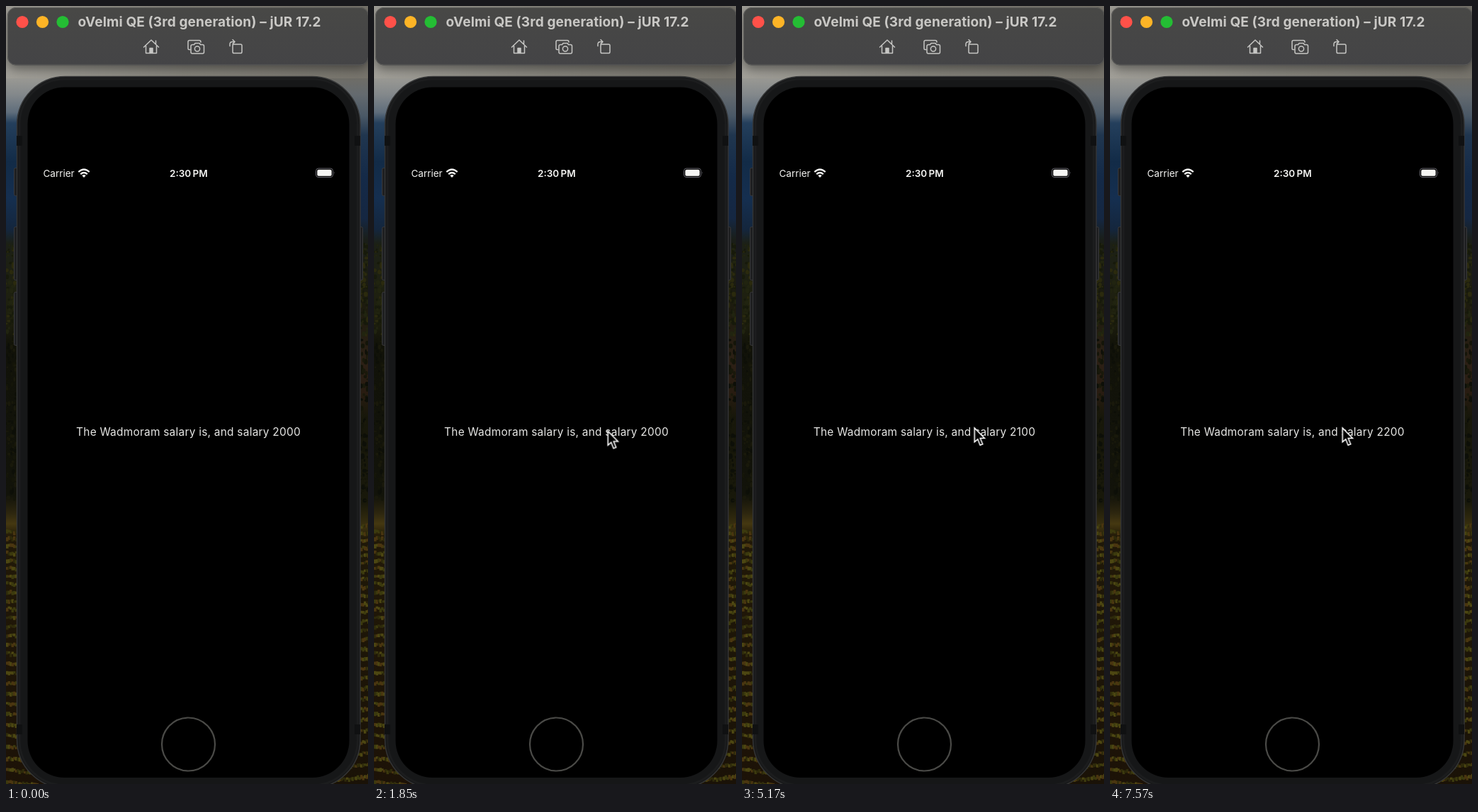
Animation, 511 px wide and 1097 px high, one loop 7.59 s. Source, as an HTML page with a canvas:

```html
<!DOCTYPE html>
<html lang="en">
<head>
<meta charset="utf-8">
<title>Salary counter</title>
<style>
  html, body { margin: 0; width: 100%; height: 100%; overflow: hidden; background: #000; }
  body { font-family: Inter, sans-serif; }
  canvas, .ui, .pointer { position: absolute; left: 0; top: 0; }
  .label {
    position: absolute; left: 31px; top: 586px; width: 453px; height: 30px;
    overflow: hidden; text-align: center; white-space: nowrap;
    font-size: 15.4px; line-height: 30px; letter-spacing: .26px; color: #e6e6e4;
  }
  .reel { animation: count 7590ms step-end infinite; }
  .pointer { width: 20px; height: 30px; overflow: visible; animation: move 7590ms linear infinite; }

  @keyframes count {
    0%    { transform: translateY(0); }
    33.4% { transform: translateY(-30px); }
    55.2% { transform: translateY(-60px); }
    76.7% { transform: translateY(-90px); }
    92.5% { transform: translateY(-120px); }
  }
  @keyframes move {
    0%, 6%      { transform: translate(514px, 908px); animation-timing-function: ease-out; }
    9.1%        { transform: translate(456.5px, 857.5px); animation-timing-function: ease-in-out; }
    20.6%       { transform: translate(337px, 622px); animation-timing-function: ease-out; }
    24%, 27%    { transform: translate(329.5px, 598.5px); animation-timing-function: ease-out; }
    30%, 100%   { transform: translate(327.5px, 594px); }
  }
</style>
</head>
<body>
<canvas id="scene" width="511" height="1097"></canvas>

<svg class="ui" width="511" height="1097" viewBox="0 0 511 1097">
  <defs>
    <linearGradient id="bar" x2="0" y2="1">
      <stop offset="0" stop-color="#484846"/>
      <stop offset="1" stop-color="#444446"/>
    </linearGradient>
    <filter id="soft" x="-10%" y="-20%" width="120%" height="150%"><feGaussianBlur stdDeviation="8"/></filter>
  </defs>

  <!-- window bar -->
  <rect x="2" y="8" width="510" height="80" rx="12" opacity=".45" filter="url(#soft)"/>
  <rect x="2" y="2" width="510" height="81.5" rx="12" fill="url(#bar)"/>
  <rect x="2.5" y="2.5" width="509" height="80.5" rx="11.5" fill="none" stroke="#5c5c5a"/>
  <circle cx="23" cy="22.5" r="8.6" fill="#ff5149"/>
  <circle cx="51.5" cy="22.5" r="8.6" fill="#fdb426"/>
  <circle cx="80" cy="22.5" r="8.6" fill="#24bd34"/>
  <text x="101.5" y="28.5" font-size="19" font-weight="700" letter-spacing=".13" fill="#c9c8c5">oVelmi QE (3rd generation) – jUR 17.2</text>

  <g fill="none" stroke="#c6c6c4" stroke-width="1.5" stroke-linejoin="round" stroke-linecap="round">
    <path d="M194.5 58 205 48 215.5 58M197.5 56V66.5H212.5V56M211.5 53.5V49"/>
    <path d="M203 66.5V59.5H207V66.5" fill="#c6c6c4"/>
    <path d="M260 61.5H258.5Q257 61.5 257 60V50.5Q257 48.5 259 48.5H273Q275 48.5 275 51"/>
    <path d="M263.5 54.5H265.5L267 52.5H273L274.5 54.5H277.5Q279.5 54.5 279.5 56.5V65Q279.5 67 277.5 67H263Q261 67 261 65V56.5Q261 54.5 263.5 54.5Z"/>
    <circle cx="270" cy="60.3" r="3.6"/>
    <rect x="320" y="54" width="13" height="12.5" rx="1.8"/>
    <path d="M316 56.5V54Q316 50.5 319.5 50.5H322.5M320 47.5 323 50.5 320 53.5"/>
  </g>

  <!-- device -->
  <g fill="#1d1e20" stroke="#39393b">
    <rect x="11.5" y="228.5" width="6" height="39" rx="2"/>
    <rect x="11.5" y="311.5" width="6" height="75" rx="2"/>
    <rect x="11.5" y="403.5" width="6" height="75" rx="2"/>
    <rect x="498" y="311.5" width="5.5" height="75" rx="2"/>
  </g>
  <rect x="15.5" y="99.5" width="484.5" height="1003" rx="68" fill="#161718" stroke="#343536" stroke-width="1.5"/>
  <rect x="19" y="103" width="477.5" height="996" rx="64" fill="none" stroke="#1c1d1e" stroke-width="3"/>
  <path d="M15 183h8v14h-8zM492 183h8v14h-8zM15 1013h8v14h-8zM492 1013h8v14h-8z" fill="#101112"/>
  <rect x="30.5" y="114.5" width="454" height="973.5" rx="52" fill="#000"/>
  <circle cx="257.5" cy="1041" r="37.5" fill="none" stroke="#4a4a47" stroke-width="2.2"/>

  <!-- status bar -->
  <g fill="#f5f5f3">
    <text x="52.5" y="240.5" font-size="13.5">Carrier</text>
    <text x="231" y="240.5" font-size="13.5" font-weight="600">2:30&#8201;PM</text>
    <path d="M110 242 107.3 239Q110 236.8 112.7 239Z"/>
    <g fill="none" stroke="#f5f5f3" stroke-width="2.3">
      <path d="M105.2 237.2Q110 232.9 114.8 237.2M102.3 234Q110 227 117.7 234"/>
    </g>
    <rect x="437.5" y="229" width="24" height="12.5" rx="3.5" fill="none" stroke="#66656d"/>
    <rect x="439.3" y="230.8" width="20.4" height="8.9" rx="2"/>
    <path d="M463 233.3q1.6 2 0 4z" fill="#66656d"/>
  </g>
</svg>

<div class="label">
  <div class="reel">
    <div>The Wadmoram salary is, and salary 2000</div>
    <div>The Wadmoram salary is, and salary 2050</div>
    <div>The Wadmoram salary is, and salary 2100</div>
    <div>The Wadmoram salary is, and salary 2150</div>
    <div>The Wadmoram salary is, and salary 2200</div>
  </div>
</div>

<svg class="pointer" viewBox="0 0 20 30">
  <path d="M.7 .9V20.8L5.3 16.8 8.6 25.2 12.2 23.7 8.8 15.5H14.9Z" fill="#000" stroke="#fff" stroke-width="1.6"/>
</svg>

<script>
  const ctx = document.getElementById('scene').getContext('2d');
  const W = 511, H = 1097;
  let seed = 7;
  const rnd = () => (seed = seed * 16807 % 2147483647) / 2147483647;
  const mix = (a, b) => a + (b - a) * rnd();
  const pick = list => list[Math.floor(rnd() * list.length)];

  function strip(x, w, stops) {
    const g = ctx.createLinearGradient(0, 0, 0, H);
    for (const [y, color] of stops) g.addColorStop(y / H, color);
    ctx.fillStyle = g;
    ctx.fillRect(x, 0, w, H);
  }

  function leaves(x0, x1, y0, y1, count, colors) {
    for (let i = 0; i < count; i++) {
      ctx.fillStyle = pick(colors);
      ctx.beginPath();
      ctx.ellipse(mix(x0, x1), mix(y0, y1), mix(1, 3), mix(1, 4), 0, 0, 7);
      ctx.fill();
    }
  }

  // rows of vines that grow thicker towards the viewer
  function vines(x0, x1, slope) {
    for (let y = 738; y < H + 20; y += 10 + (y - 738) / 50) {
      for (let x = x0; x < x1; x += 2.5) {
        ctx.fillStyle = pick(['#4d4712', '#3c3a0e', '#4a3610', '#2e2a0b']);
        ctx.fillRect(x, y + (x - x0) * slope + mix(-1.5, 1.5), 3.5, mix(3, 6));
      }
    }
  }

  strip(0, 256, [[0, '#aaa395'], [100, '#9b9a94'], [125, '#83888b'], [150, '#5f6d7b'], [165, '#243f5c'],
    [220, '#122b47'], [270, '#152f50'], [315, '#14263d'], [335, '#1c2016'], [440, '#1f200e'],
    [480, '#111209'], [690, '#12130a'], [715, '#2d260f'], [730, '#453811'], [748, '#211908'], [H, '#1c1207']]);
  strip(256, 255, [[0, '#8d8679'], [100, '#6f6d66'], [125, '#646a6f'], [155, '#4a5866'], [182, '#20364f'],
    [240, '#142a48'], [300, '#152742'], [330, '#1a1e18'], [420, '#1c1b0e'], [500, '#2c2015'],
    [545, '#281c11'], [580, '#17170a'], [700, '#18180a'], [735, '#3b310f'], [752, '#1f1808'], [H, '#1a1207']]);

  // sky between the window bar and the device
  const sky = ctx.createLinearGradient(0, 0, W, 0);
  sky.addColorStop(0, '#a19f98');
  sky.addColorStop(.5, '#86847c');
  sky.addColorStop(1, '#77746c');
  ctx.fillStyle = sky;
  ctx.fillRect(0, 0, W, 102);

  for (const [x0, x1] of [[0, 18], [498, W]]) {
    leaves(x0, x1, 336, 470, 90, ['#2b2a0e', '#171a0b', '#212410']);
    leaves(x0, x1, 470, 700, 110, ['#0d0f08', '#19190b', '#141509']);
  }
  vines(0, 60, .12);
  vines(450, W, -.12);
</script>
</body>
</html>
```
